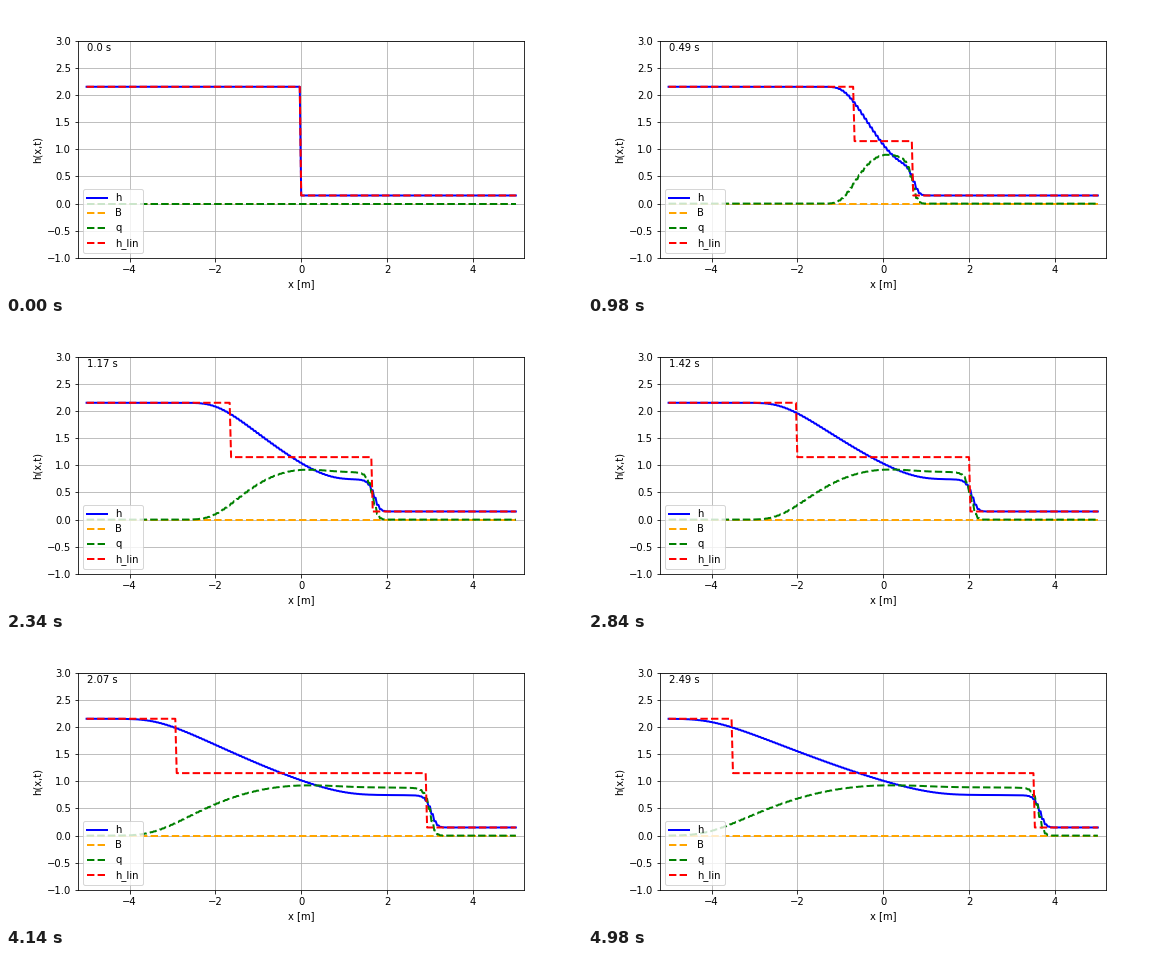
Animation, 576 px wide and 288 px high, one loop 5 s. Source, as a matplotlib script:

```python
import numpy as np
import matplotlib.pyplot as plt
from matplotlib.animation import FuncAnimation

FRAMES = 250
DT = 0.01
G = 1.0
H_LEFT, H_RIGHT = 2.15, 0.15
C_LIN = np.sqrt(2.0)

x = np.arange(-150, 151) / 30
dx = 1 / 30


def dam(pos):
    return np.where(pos < -1e-9, H_LEFT, H_RIGHT)


def lax_friedrichs(state):
    """Advance the shallow water state (h, q) by one time step."""
    s = np.pad(state, ((0, 0), (1, 1)), mode="edge")
    h, q = s
    flux = np.array([q, q**2 / h + 0.5 * G * h**2])
    mean = 0.5 * (s[:, 2:] + s[:, :-2])
    return mean - DT / (2 * dx) * (flux[:, 2:] - flux[:, :-2])


def linear_wave(t):
    return 0.5 * (dam(x - C_LIN * t) + dam(x + C_LIN * t))


states = [np.array([dam(x), np.zeros_like(x)])]
for _ in range(FRAMES - 1):
    states.append(lax_friedrichs(states[-1]))

plt.rcParams["font.family"] = "DejaVu Sans"
plt.rcParams["font.size"] = 10

fig, ax = plt.subplots(figsize=(8, 4), dpi=72)
fig.subplots_adjust(left=0.125, right=0.9, bottom=0.125, top=0.88)
ax.set(xlim=(-5.2, 5.2), ylim=(-1, 3), xlabel="x [m]", ylabel="h(x,t)")
ax.grid(True)

zero = np.zeros_like(x)
line_h, = ax.plot(x, zero, color="blue", lw=2, label="h")
ax.plot(x, zero, "--", color="orange", lw=2, label="B")
line_q, = ax.plot(x, zero, "--", color="green", lw=2, label="q")
line_lin, = ax.plot(x, zero, "--", color="red", lw=2, label="h_lin")
clock = ax.text(-5, 2.8, "")
ax.legend(loc="lower left")


def update(n):
    h, q = states[n]
    t = round(n * DT, 2)
    line_h.set_ydata(h)
    line_q.set_ydata(q)
    line_lin.set_ydata(linear_wave(t))
    clock.set_text(f"{t} s")
    return line_h, line_q, line_lin, clock


anim = FuncAnimation(fig, update, frames=FRAMES, interval=20,
                     repeat=True, repeat_delay=0)
plt.show()
```
